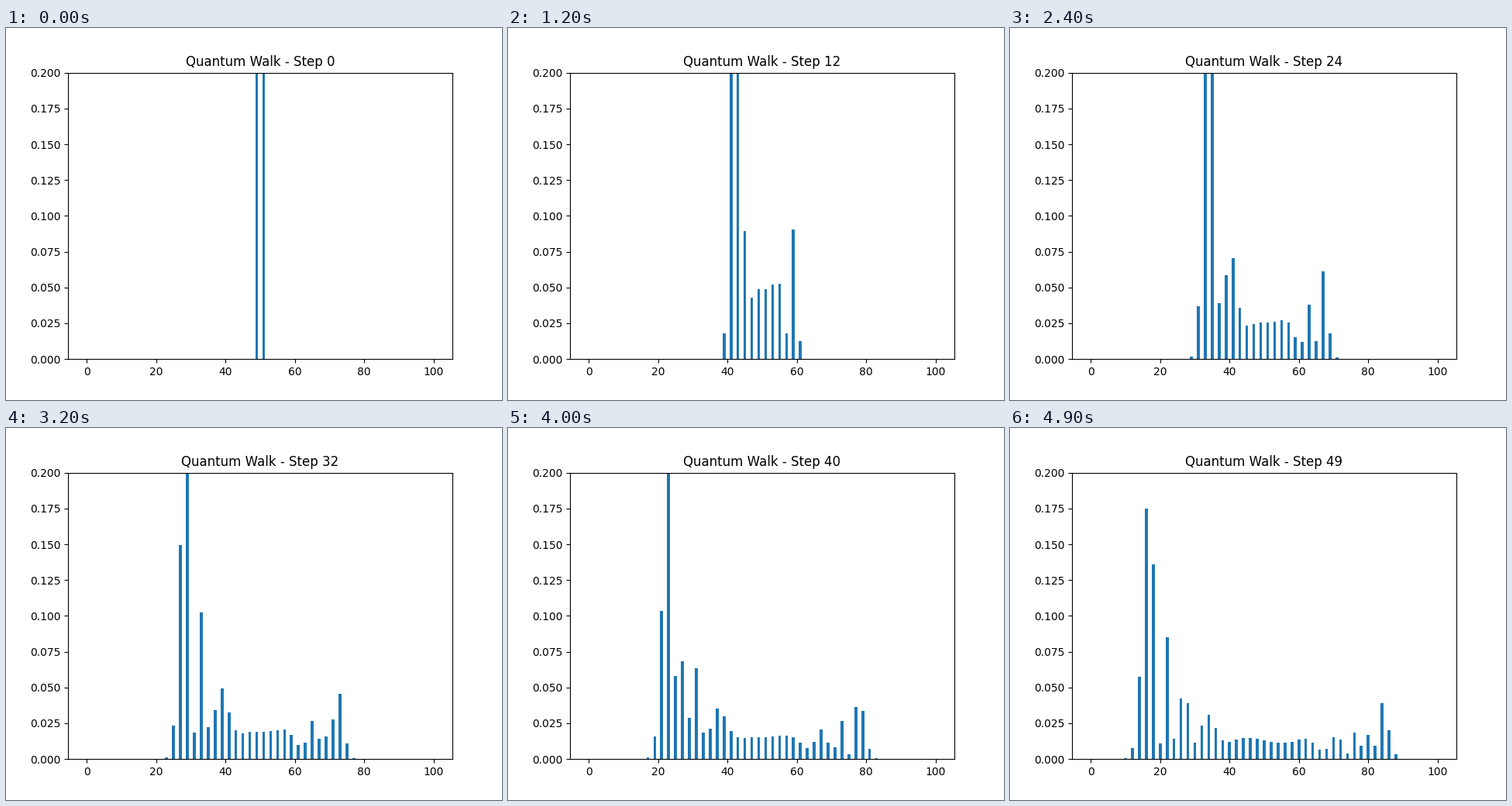
Recreate the animation shown at these times as a matplotlib script. Size 640 by 480 pixels, loop 5 s.

```python
import numpy as np
import matplotlib.pyplot as plt
from matplotlib.animation import FuncAnimation

STEPS = 50
SITES = 2 * STEPS + 1


def walk_probabilities():
    """Position distribution after each step of a Hadamard walk from the centre."""
    left, right = np.zeros(SITES), np.zeros(SITES)
    left[STEPS] = 1
    history = []
    for _ in range(STEPS):
        left, right = (left + right) / np.sqrt(2), (left - right) / np.sqrt(2)
        left, right = np.roll(left, -1), np.roll(right, 1)
        history.append(left**2 + right**2)
    return history


probabilities = walk_probabilities()

plt.rcParams["font.family"] = "DejaVu Sans"
fig, ax = plt.subplots(figsize=(6.4, 4.8), dpi=100)
bars = ax.bar(np.arange(SITES), probabilities[0], color="#1f77b4")
ax.set_ylim(0, 0.2)
title = ax.set_title("Quantum Walk - Step 0")


def update(step):
    for bar, height in zip(bars, probabilities[step]):
        bar.set_height(height)
    title.set_text(f"Quantum Walk - Step {step}")
    return [*bars, title]


anim = FuncAnimation(fig, update, frames=STEPS, interval=100, repeat=True)
plt.show()
```
